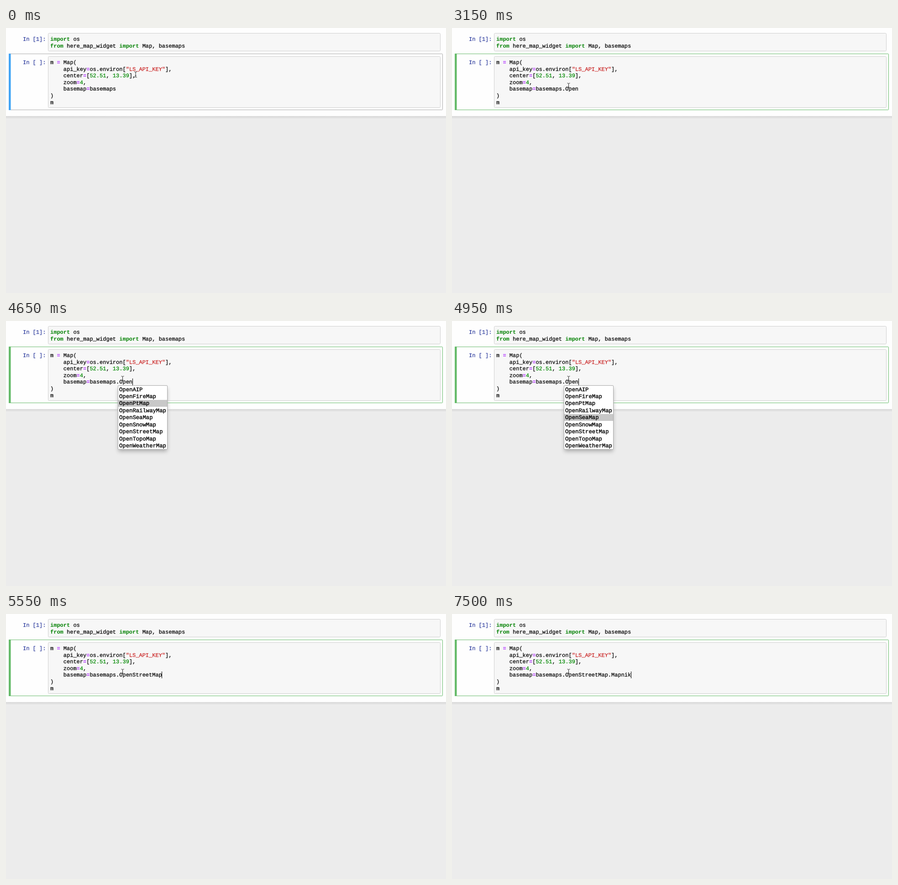
An HTML page that plays this animation: 964 by 581 pixels, repeating every 8 s.

```html
<!DOCTYPE html>
<html lang="en">
<head>
<meta charset="utf-8">
<title>Notebook completion</title>
<style>
  html, body { margin: 0; width: 100%; height: 100%; overflow: hidden; background: #ececec; }
  svg { position: absolute; left: 0; top: 0; }
  text, #popup {
    font: 12px "Liberation Mono", "Courier New", monospace;
    text-rendering: geometricPrecision;
    white-space: pre;
  }
  text { fill: currentColor; stroke: currentColor; stroke-width: .25px; }
  tspan { fill: currentColor; stroke: currentColor; }
  .prompt { color: #303f9f; }
  .box { fill: #f7f7f7; stroke: #cfcfcf; }
  .key { color: #008000; font-weight: bold; stroke: none; }
  .op { color: #a2f; font-weight: bold; stroke: none; }
  .num { color: #080; }
  .str { color: #ca2424; }
  #popup {
    position: absolute; top: 141px; box-sizing: border-box;
    border: 1px solid #ababab; border-radius: 2px; background: #fff;
    box-shadow: 0 5px 8px -1px #adadad;
    font-size: 12.25px; line-height: 15.44px;
    -webkit-text-stroke: .4px #000;
  }
  #popup div { box-sizing: border-box; height: 15.44px; padding: 1.5px 2px 0; }
  #popup .on { background: #c8c8c8; }
</style>
</head>
<body>
<svg width="964" height="581">
  <defs>
    <linearGradient id="edge" x2="0" y2="1">
      <stop stop-color="#dadada"/><stop offset="1" stop-color="#e3e3e3"/>
    </linearGradient>
    <path id="beam" d="M-3 -6H-1.5L0 -5L1.5 -6H3M-3 6H-1.5L0 5L1.5 6H3M0 -5V5M-1.5 2.5H1.5"/>
  </defs>
  <rect width="964" height="193" fill="#fefefe"/>
  <rect y="193" width="964" height="5" fill="url(#edge)"/>

  <rect class="box" x="92.5" y="11.5" width="859" height="39" rx="2"/>
  <text class="prompt" x="37" y="28">In [1]:</text>
  <text x="97" y="28"><tspan class="key">import</tspan> os</text>
  <text x="97" y="43"><tspan class="key">from</tspan> here_map_widget <tspan class="key">import</tspan> Map, basemaps</text>

  <rect id="frame" x="6.5" y="56.7" width="950" height="122.8" rx="1" fill="#fefefe"/>
  <rect id="bar" x="6" y="56.2" width="4.5" height="123.8"/>
  <rect class="box" x="92.5" y="62.5" width="859" height="112" rx="2"/>
  <text class="prompt" x="37" y="79">In [ ]:</text>
  <text x="97" y="79">m <tspan class="op">=</tspan> Map(</text>
  <text x="125.8" y="94">api_key<tspan class="op">=</tspan>os.environ[<tspan class="str">"LS_API_KEY"</tspan>],</text>
  <text x="125.8" y="108">center<tspan class="op">=</tspan>[<tspan class="num">52.51</tspan>, <tspan class="num">13.39</tspan>],</text>
  <text x="125.8" y="123">zoom<tspan class="op">=</tspan><tspan class="num">4</tspan>,</text>
  <text x="125.8" y="137">basemap<tspan class="op">=</tspan>basemaps<tspan id="typed"></tspan></text>
  <text x="97" y="152">)</text>
  <text x="97" y="167">m</text>
  <rect id="caret" y="126" width="1" height="15"/>
  <g id="mouse" fill="none">
    <use href="#beam" stroke="#fff" stroke-opacity=".7" stroke-width="2"/>
    <use href="#beam" stroke="#222"/>
  </g>
</svg>
<div id="popup"></div>

<script>
const $ = id => document.getElementById(id);
const LOOP = 8000, CHAR = 7.2, TEXT_X = 97, BASE_COL = 20;
const maps = ["AIP", "FireMap", "PtMap", "RailwayMap", "SeaMap", "SnowMap",
  "StreetMap", "TopoMap", "WeatherMap"].map(name => "Open" + name);
const styles = ["Mapnik", "mro"];

// [start ms, pointer x, pointer y]
const pointer = [[0, 284, 102], [150, 267, 116], [300, 255.5, 127]];

// [start ms, typed text, caret visible, completions, selected row]
const street = ".OpenStreetMap";
const steps = [
  [0, "", false],
  [600, "", true],
  [1050, "", false],
  [1350, ".", true],
  [1800, ".O", true],
  [2100, ".Op", true],
  [2250, ".Ope", true],
  [2550, ".Open", true],
  [3150, ".Open", false],
  [3450, ".Open", false, maps, 0],
  [3600, ".Open", true, maps, 0],
  [4200, ".Open", false, maps, 1],
  [4650, ".Open", true, maps, 2],
  [4800, ".Open", true, maps, 3],
  [4950, ".Open", true, maps, 4],
  [5100, ".Open", true, maps, 5],
  [5250, ".Open", false, maps, 6],
  [5550, street, true],
  [6000, street, false],
  [6300, street + ".", true],
  [6750, street + ".M", true],
  [7050, street + ".M", true, styles, 0],
  [7350, street + ".M", false, styles, 0],
  [7500, street + ".Mapnik", true]
];

const at = (list, t) => list.findLast(item => item[0] <= t);
const colX = col => Math.floor(TEXT_X + CHAR * col);
let shown;

function showPopup(items, selected, typed) {
  const popup = $("popup");
  popup.hidden = !items;
  if (!items) return;
  popup.style.left = colX(BASE_COL + typed.lastIndexOf(".") + 1) - 3 + "px";
  popup.innerHTML = items.map((name, i) =>
    `<div class="${i === selected ? "on" : ""}">${name}</div>`).join("");
}

function draw(now) {
  const t = now % LOOP;
  const [, x, y] = at(pointer, t);
  $("mouse").setAttribute("transform", `translate(${x} ${y})`);

  const step = at(steps, t);
  if (step !== shown) {
    shown = step;
    const [start, typed, caret, items, selected] = step;
    const editing = start >= 600;
    $("frame").setAttribute("stroke", editing ? "#66bb6a" : "#ababab");
    $("bar").setAttribute("fill", editing ? "#66bb6a" : "#42a5f5");
    $("typed").textContent = typed;
    $("caret").setAttribute("x", colX(BASE_COL + typed.length));
    $("caret").setAttribute("visibility", caret ? "visible" : "hidden");
    showPopup(items, selected, typed);
  }
  requestAnimationFrame(draw);
}
draw(performance.now());
</script>
</body>
</html>
```
